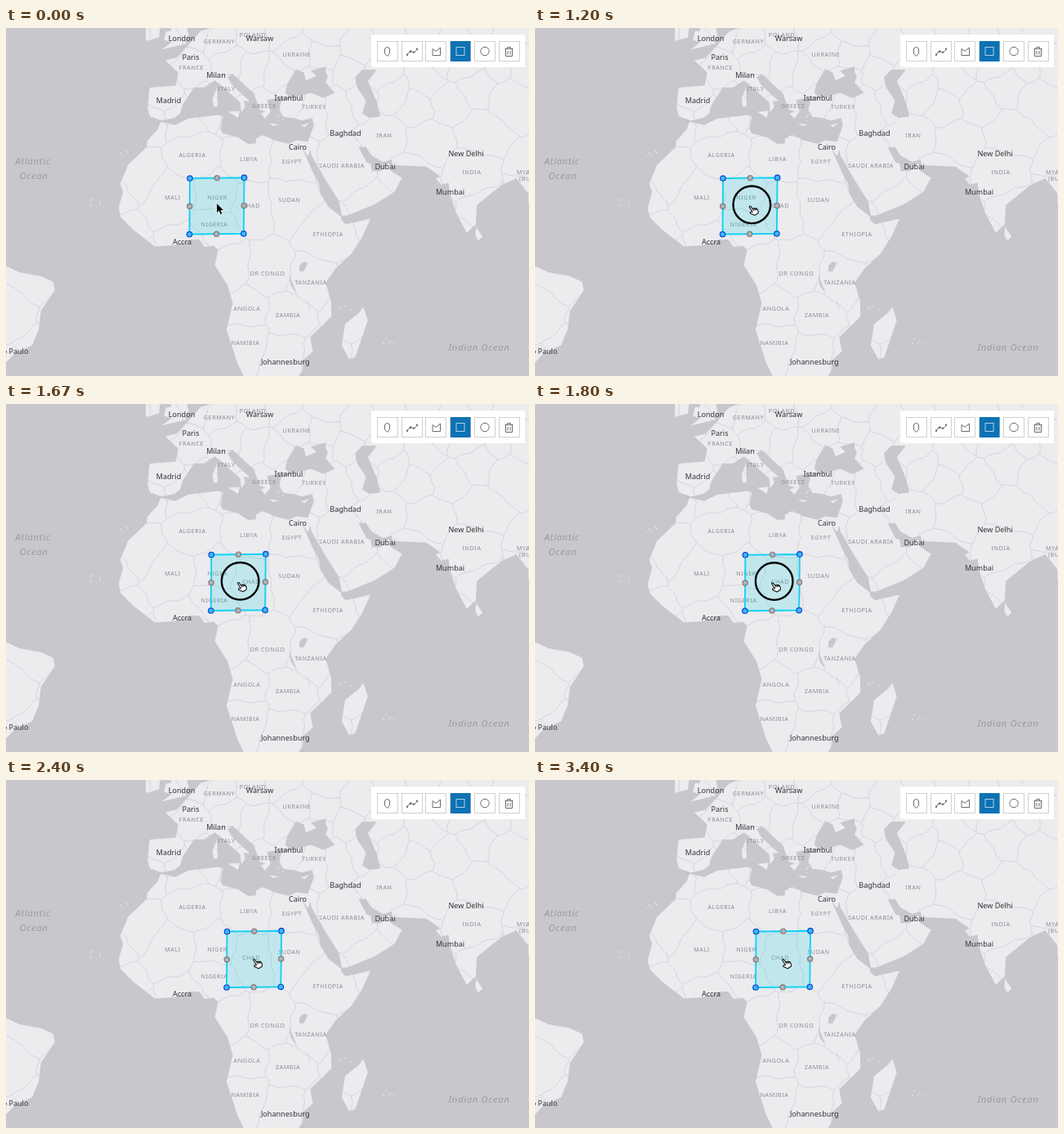
Animation of 640x426 px, one loop 3.47 s. Source, as an HTML page with a canvas:

```html
<!DOCTYPE html>
<html lang="en">
<head>
<meta charset="utf-8">
<title>Map sketch</title>
<style>
html, body { margin: 0; width: 100%; height: 100%; overflow: hidden; background: #c9c8cd; }
canvas { display: block; }
</style>
</head>
<body>
<canvas id="stage" width="640" height="426"></canvas>
<script>
const W = 640, H = 426, LOOP = 3470, STEPS = 52;
const SEA = '#c9c7cd', LAND = '#ecebee', BORDER = '#d8d7db';
const PX_PER_DEG = 4.49, RAD = Math.PI / 180;

// Key points of the coasts as "lon,lat"; neighbouring pieces overlap.
const land = {
  africa: '-6,35.8 -2,35.1 1.5,36.5 9.7,37.3 11,37 10.3,34.3 11,33.2 15.2,32.3 18,30.7 20,30.9 20,32 22,32.9 25,31.6 29,30.8 31,31.6 34.2,31.3 32.5,30 35.5,24 37.2,21 37.5,18.6 39.7,15.1 43.2,12.5 43.3,11.5 44.5,10.4 51.2,11.9 49,7 46,2.4 41.6,-1.7 39,-5.5 40.5,-10.5 40.6,-14.5 37,-17.9 34.8,-19.9 35.5,-23.5 32.8,-25.7 32.8,-28 30.5,-31 17.5,-31 15,-26.5 12,-18 13.7,-11 12.2,-6 8.8,-.7 9.7,3.5 8.5,4.6 6,4.3 4.6,6.3 2,6.3 -2,4.8 -7.5,4.4 -13.2,8.8 -16.8,12.3 -17.4,14.7 -16.2,19 -17,21 -14.8,25.8 -9.8,30 -9.6,31.5 -6.8,34.1',
  arabia: '34.2,31.3 32.5,30 34.2,27.8 34.9,29.5 35.1,28.1 39,22 42.7,16.5 43.4,12.7 45,12.8 52.2,15.6 57.8,19 59.8,22.5 56.8,24.3 56.3,26.2 54,24.2 51.6,24.2 51.3,26 50.2,26.3 48,30 45,38 35,38 35.8,35',
  asia: '45,38 48,30 50,30.1 51.5,28 54.7,26.5 57,27 57.3,25.7 66.5,25.3 70.3,22.9 69,22.3 70.5,20.8 72.5,21.3 73,18 74.8,13 77.5,8.1 79.9,10.4 80.2,15.5 86.9,20.7 91,22.4 94.3,18.5 94.3,16 97,16 97,56 39,56 39,46',
  turkey: '39,44 41.5,42 38.4,40.9 35,42 31.2,41.1 27,40.4 26.3,38.3 27.5,36.9 30.6,36.6 32.5,36.1 36,36.8 50,36 50,46 40,46',
  europe: '42,56 42,46 39.2,47.1 35,46.3 36.5,45.3 33.7,44.4 33,46 31,46.6 28.6,43.8 28,42 29,41.2 23,40.5 24,38 22.5,36.5 21.3,37.7 22.8,38 21,38.5 19.5,41.8 13.6,45.7 12.3,45 13.6,43.5 16,41.8 18.4,40.2 16.7,40.3 17.1,39 16,37.9 15.7,40 10.3,43.6 8.8,44.4 6,43.1 3.1,43 0,39.5 -.7,37.6 -2.2,36.7 -5.6,36.1 -8.9,37 -9.5,38.7 -9,43 -1.8,43.4 -1.2,46 -4.7,48.2 -1.6,48.7 1.6,50.9 4.8,53.2 9,54 9,56',
  brazil: '-50,0 -44.5,-2.6 -38.5,-3.7 -35.3,-5.2 -34.8,-7.5 -38.6,-13 -39.2,-17.9 -41,-22 -45.5,-23.8 -50,-28',
  britain: '-5.7,50.1 1.4,51.2 .6,51.5 1.7,52.6 0,56 -3,56 -3.1,53.3 -4.5,53.2 -5.1,51.8 -3,51.4',
  ireland: '-6.2,53.5 -6.4,52.2 -10,51.6 -10,54.5 -6,55',
  madagascar: '49.3,-12 50.5,-15.5 47.1,-24.9 45.5,-25.5 43.4,-22 44.3,-16.5 48,-13.6',
  sriLanka: '80,9.8 81.8,7 80.6,6 79.8,7.5',
  sicily: '12.5,38 15.6,38.2 15.1,36.7',
  sardinia: '8.2,40.9 9.4,43 9.6,39.2 8.5,39',
  crete: '23.6,35.5 26.3,35.2 24.8,34.9',
  cyprus: '32.3,35 34.5,35.6 33.3,34.6'
};
const lakes = [
  '47,45 49,46.5 53,46.5 50.5,44.3 53,40 53.9,37 51,36.7 49,37.6 50,40.4 47.6,43',
  '31.8,-.8 33,.3 34.2,0 33,-2.4 31.9,-2.4',
  '29.2,-3.4 31.2,-8.6 29.4,-6',
  '34,-9.6 35.2,-14.2 34.2,-11'
];
const archipelagos = '-16,28.4 -24,16 44.3,-12.3 56,-20.8 27,36.8';

const cities = 'London 215 13;Warsaw 310.5 12.3;Paris 226 35.3;Milan 257 57.5;Madrid 199 88.3;Istanbul 346 85.3;Baghdad 415.5 128.3;Cairo 357 146;New Delhi 563 153.3;Dubai 464 170;Mumbai 543.5 201;Accra 215.5 262;Johannesburg 341.7 409;São Paulo 6.5 396';
const countries = 'GERMANY 261 16;POLAND 302 8;UKRAINE 356 32;FRANCE 227 48;ITALY 270 74;GREECE 316 95;TURKEY 377 96;IRAN 463 131;ALGERIA 228 155;LIBYA 297 160;EGYPT 350 163;SAUDI ARABIA 411 168;INDIA 570 176;MALI 204 207;NIGER 258.5 207;CHAD 300 217;SUDAN 347 210;NIGERIA 255 240;ETHIOPIA 394 252;DR CONGO 320 300;TANZANIA 373 311;ANGOLA 295 343;ZAMBIA 345 351;NAMIBIA 293 385;MYANMAR 645 176;(BURMA) 645 184';
const oceans = 'Atlantic 33 162.5;Ocean 34 180.5;Indian Ocean 579 391';

const project = ([lon, lat]) => [
  216 + lon * PX_PER_DEG,
  287.3 - PX_PER_DEG / RAD * Math.log(Math.tan(Math.PI / 4 + lat * RAD / 2))
];
const parsePoints = text => text.split(' ').map(pair => project(pair.split(',').map(Number)));
const parseLabels = list => list.split(';').map(item => {
  const [, text, x, y] = item.match(/^(.*) (\S+) (\S+)$/);
  return { text, x: +x, y: +y };
});

function makeRandom(seed) {
  return () => (seed = seed * 16807 % 2147483647) / 2147483647;
}

function trace(g, points) {
  g.beginPath();
  points.forEach(([x, y]) => g.lineTo(x, y));
  g.closePath();
}

function fillShapes(g, shapes) {
  for (const shape of shapes) {
    trace(g, parsePoints(shape));
    g.fill();
  }
}

function dot(g, x, y, r, fill, stroke, width) {
  g.beginPath();
  g.arc(x, y, r, 0, 2 * Math.PI);
  if (fill) { g.fillStyle = fill; g.fill(); }
  if (stroke) { g.strokeStyle = stroke; g.lineWidth = width; g.stroke(); }
}

function drawLabels(g, list, style, size, spacing, color) {
  g.font = `${style} ${size}px "Noto Sans", "Open Sans", sans-serif`;
  g.letterSpacing = spacing + 'px';
  g.textAlign = 'center';
  g.fillStyle = color;
  for (const { text, x, y } of parseLabels(list)) g.fillText(text, x, y + size * 0.36);
}

// One site per labelled country, then random ones in the gaps, closer together in the north.
function borderSites() {
  const random = makeRandom(17);
  const sites = parseLabels(countries).map(({ x, y }) => [x, y]);
  for (let i = 0; i < 1500; i++) {
    const x = random() * W, y = random() * H;
    const gap = y < 110 ? 27 : 44;
    if (sites.every(([sx, sy]) => Math.hypot(sx - x, sy - y) > gap)) sites.push([x, y]);
  }
  return sites;
}

// Keeps the part of the polygon that is nearer to a than to b.
function clipNearer(polygon, a, b) {
  const nx = b[0] - a[0], ny = b[1] - a[1];
  const side = ([x, y]) => (x - (a[0] + b[0]) / 2) * nx + (y - (a[1] + b[1]) / 2) * ny;
  return polygon.flatMap((p, i) => {
    const q = polygon[(i + 1) % polygon.length];
    const sp = side(p), sq = side(q), kept = sp <= 0 ? [p] : [];
    if (sp * sq < 0) {
      const u = sp / (sp - sq);
      kept.push([p[0] + (q[0] - p[0]) * u, p[1] + (q[1] - p[1]) * u]);
    }
    return kept;
  });
}

const wander = ([x, y]) => [x + 1.6 * Math.sin(y / 4 + x / 9), y + 1.6 * Math.sin(x / 5 - y / 11)];

function drawBorders(g) {
  const sites = borderSites();
  const frame = [[-20, -20], [W + 20, -20], [W + 20, H + 20], [-20, H + 20]];
  g.strokeStyle = BORDER;
  g.lineWidth = .7;
  for (const site of sites) {
    const cell = sites.reduce((poly, other) => other === site ? poly : clipNearer(poly, site, other), frame);
    trace(g, cell.flatMap(([x, y], i) => {
      const [nx, ny] = cell[(i + 1) % cell.length];
      return Array.from({ length: 8 }, (_, k) => wander([x + (nx - x) * k / 8, y + (ny - y) * k / 8]));
    }));
    g.stroke();
  }
}

function drawToolbar(g) {
  g.fillStyle = '#fff';
  g.fillRect(447, 8, 188, 40);
  g.lineWidth = 1;
  g.strokeStyle = '#d0d0d0';
  for (let i = 0; i < 6; i++) g.strokeRect(454.5 + Math.round(i * 29.7), 16.5, 25, 24);
  g.fillStyle = '#0d72b4';
  g.fillRect(544, 16, 24.5, 25);
  g.strokeStyle = '#6c6c6c';
  const icons = [
    'M463.5 26Q463.5 23.5 466.5 23.5T469.5 26V31L466.5 34.5 463.5 31Z',
    'M491 32.5L495 27.5 499 30.5 503 26.5',
    'M522 33.5V25.5L526 28.5 531.5 24V33.5Z',
    'M610.5 25.5H620.5M613.5 25V23.5H617.5V25M611.5 26V34.5H619.5V26M614 28V32.5M617 28V32.5'
  ];
  icons.forEach(d => g.stroke(new Path2D(d)));
  for (let i = 0; i < 4; i++) dot(g, 491 + 4 * i, 32 - 1.6 * i + (i % 2 ? -1.4 : .8), 1.2, '#6c6c6c');
  dot(g, 586, 28.5, 5.2, null, '#6c6c6c', 1);
  g.strokeStyle = '#a9d0ea';
  g.strokeRect(551, 23.5, 10, 10);
}

function makeLayer(paint) {
  const canvas = document.createElement('canvas');
  canvas.width = W;
  canvas.height = H;
  paint(canvas.getContext('2d'));
  return canvas;
}

const landLayer = makeLayer(g => {
  const random = makeRandom(5);
  g.fillStyle = LAND;
  fillShapes(g, Object.values(land));
  for (const [x, y] of parsePoints(archipelagos)) {
    for (let i = 0; i < 5; i++) dot(g, x + random() * 16 - 8, y + random() * 10 - 5, .8, LAND);
  }
  g.globalCompositeOperation = 'source-atop';
  drawBorders(g);
  g.globalCompositeOperation = 'destination-out';
  fillShapes(g, lakes);
});

const map = makeLayer(g => {
  g.fillStyle = SEA;
  g.fillRect(0, 0, W, H);
  g.drawImage(landLayer, 0, 0);
  drawLabels(g, countries, '', 7.2, .6, '#8e8d92');
  drawLabels(g, oceans, 'italic', 11.2, .7, '#9c9aa1');
  drawLabels(g, cities, '', 9.05, 0, '#343437');
  drawToolbar(g);
});

const ramp = (t, from, to) => Math.min(1, Math.max(0, (t - from) / (to - from)));

const corners = [[225, 184], [291.5, 183.2], [290.8, 251.8], [224.5, 252.5]];
const arrow = new Path2D('M0 0V11L2.6 8.6 4.6 13 6.4 12.2 4.5 8H8Z');
const hand = new Path2D('M-1.6.5Q-.6-.9.6.5L2 5Q3.2 4 4.2 5.2Q5.5 4.6 6.2 6Q7.7 5.8 8 7.5L8.3 10.5 7 13.5 1.5 14.5-3.3 9.8Q-3.7 8 -1.9 8.2L.2 9Z');
const knuckles = new Path2D('M2 5L2.6 8M4.2 5.2L4.7 8M6.2 6L6.5 8.5');

function drawArrow(g, x, y) {
  g.save();
  g.translate(x, y);
  g.strokeStyle = '#fff';
  g.lineWidth = 1;
  g.stroke(arrow);
  g.fillStyle = '#000';
  g.fill(arrow);
  g.restore();
}

function drawHand(g, x, y) {
  g.save();
  g.translate(x - 2, y + 1.8);
  g.rotate(-.35);
  g.scale(.85, .85);
  g.lineJoin = 'round';
  g.fillStyle = '#fff';
  g.fill(hand);
  g.strokeStyle = '#111';
  g.lineWidth = 1.3;
  g.stroke(hand);
  g.stroke(knuckles);
  g.restore();
}

function drawSelection(g, dx, dy) {
  const points = corners.map(([x, y]) => [x + dx, y + dy]);
  trace(g, points);
  g.fillStyle = 'rgba(0, 208, 234, .185)';
  g.fill();
  g.strokeStyle = '#14d2f5';
  g.lineWidth = 1.9;
  g.stroke();
  points.forEach(([x, y], i) => {
    const [nx, ny] = points[(i + 1) % 4];
    dot(g, (x + nx) / 2, (y + ny) / 2, 3.1, '#b3b2b5', '#7d7c80', 1.2);
    dot(g, x, y, 3.2, '#3fb9f5', '#0b50d6', 1.3);
  });
}

const ctx = document.getElementById('stage').getContext('2d');

function render(now) {
  const step = LOOP / STEPS;
  const t = Math.floor((now % LOOP + 4) / step) % STEPS * step;
  const drag = ramp(t, 1090, 2090);
  const dx = 45.5 * drag, dy = 1.5 * drag * drag;
  const x = 258 - 3 * ramp(t, 0, 600) + 5.3 * ramp(t, 600, 1090) + dx;
  const y = 215 + 1.3 * ramp(t, 0, 1090) + dy;

  ctx.drawImage(map, 0, 0);
  drawSelection(ctx, dx, dy);
  if (t >= 1090 && t < 2400) dot(ctx, x, y, 22.8, null, '#000', 2.4);
  if (t < 300) drawArrow(ctx, x, y);
  else drawHand(ctx, x, y);
  requestAnimationFrame(() => render(performance.now() - start));
}
const start = performance.now();
render(0);
</script>
</body>
</html>
```
